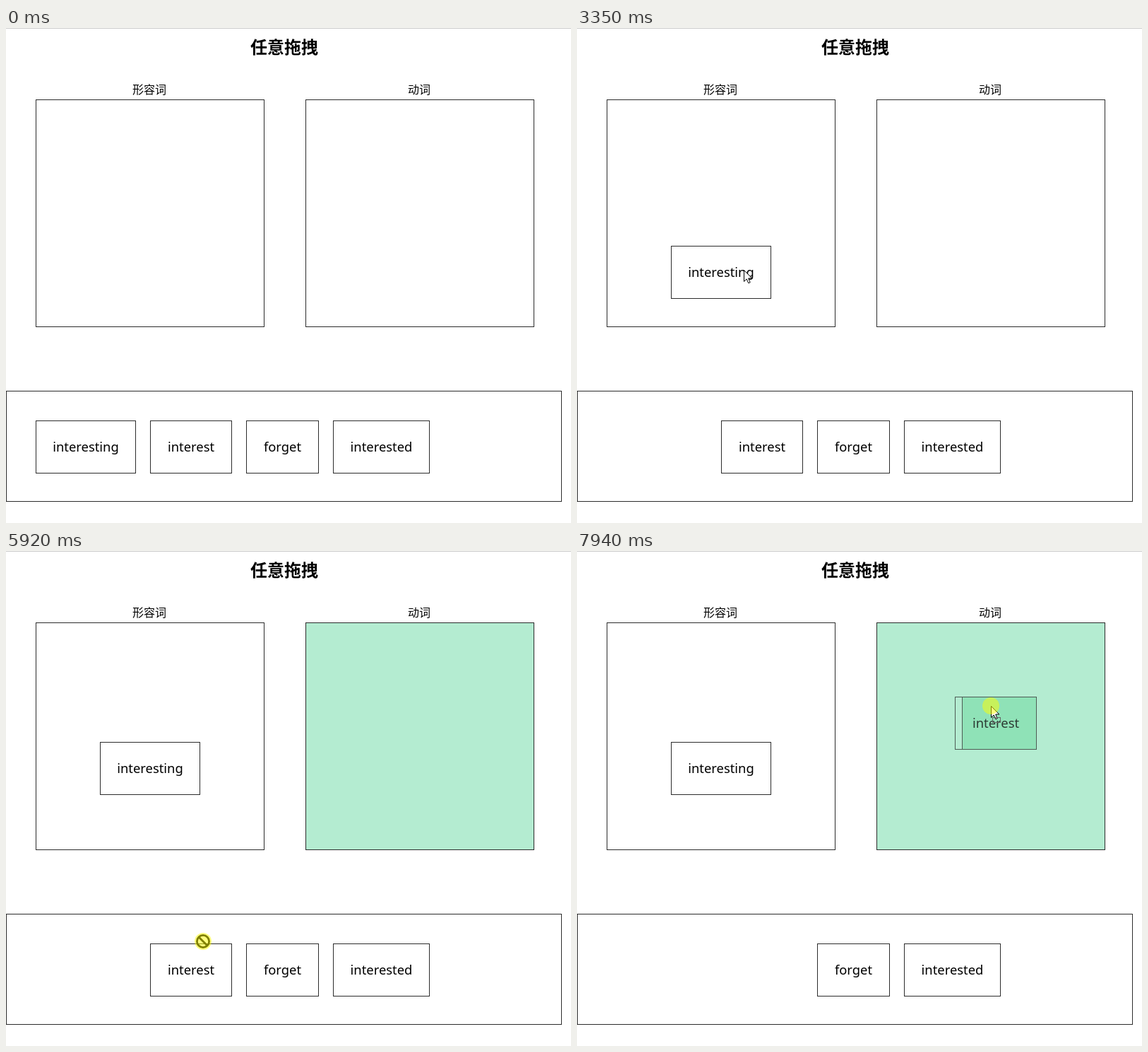
Recreate the animation shown at these times as an HTML page. Size 800 by 700 pixels, loop 8 s.

```html
<!DOCTYPE html>
<html lang="zh">
<head>
<meta charset="utf-8">
<title>任意拖拽</title>
<style>
html, body { margin: 0; width: 100%; height: 100%; overflow: hidden; background: #fff; }
svg { display: block; width: 100%; height: 100%; }
text { text-anchor: middle; font: 16px "Noto Sans CJK SC", "Noto Sans CJK", "Noto Sans", sans-serif; }
.title { font-size: 24px; font-weight: bold; }
.word { font: 18.4px "Noto Sans", "Open Sans", sans-serif; }
.box { fill: none; stroke: #2c2c2c; }
.ghost { opacity: .75; }
.arrow { fill: #fff; stroke: #000; stroke-linejoin: round; }
</style>
</head>
<body>
<svg id="stage" viewBox="0 0 800 700">
  <path d="M0 .5H800" stroke="#ccc"/>
  <text class="title" x="394" y="36">任意拖拽</text>
  <text x="203" y="93">形容词</text>
  <text x="585" y="93">动词</text>
  <rect class="box" x=".5" y="513.5" width="786" height="156"/>
</svg>
<script>
const LOOP = 8000, STEP = 67, HOLD = 200, LIFT_DELAY = 135;
const PANEL = { y: 101, width: 323, height: 321 };
const CARD = { y: 555, height: 74, gap: 21 };
const stage = document.getElementById('stage');

// Each move starts where the last one ended; bow bends its path sideways.
// A move with a card drags it: pressed HOLD before the start, dropped HOLD after the end.
const moves = [
  { start: 110, end: 860, to: [179, 598], bow: 60 },
  { start: 930, end: 1280, to: [145, 589] },
  { start: 1680, end: 3150, to: [236, 342], bow: 17, card: 0 },
  { start: 3940, end: 4500, to: [236, 304], card: 0 },
  { start: 4900, end: 5650, to: [269, 577] },
  { start: 5850, end: 6600, to: [479, 342], bow: -37, card: 1 },
  { start: 7260, end: 7930, to: [586, 219], card: 1 }
];

function add(markup, className = '') {
  const g = document.createElementNS('http://www.w3.org/2000/svg', 'g');
  g.setAttribute('class', className);
  g.innerHTML = markup;
  stage.append(g);
  return g;
}

const box = (x, y, width, height) =>
  `<rect class="box" x="${x + .5}" y="${y + .5}" width="${width}" height="${height}"/>`;

const cardMarkup = ({ word, width }) =>
  box(0, 0, width, CARD.height) + `<text class="word" x="${width / 2 + .5}" y="44">${word}</text>`;

// A card lifted from a panel carries the panel's colour and border with it.
function tintMarkup(width, edge) {
  const border = edge > 0 ? `<path d="M${edge + .5} 0V${CARD.height + 1}" stroke="#2c2c2c"/>` : '';
  const left = Math.max(edge, 0);
  return `<rect x="${left}" width="${width - left}" height="${CARD.height + 1}" fill="#3ecc7e" fill-opacity=".42"/>` + border;
}

const panels = [42, 424].map(x => ({ x, node: add(box(x, PANEL.y, PANEL.width, PANEL.height)) }));

let nextX = 42;
const cards = Object.entries({ interesting: 141, interest: 115, forget: 102, interested: 136 })
  .map(([word, width]) => {
    const card = { word, width, home: [nextX, CARD.y] };
    nextX += width + CARD.gap;
    card.node = add(cardMarkup(card));
    return card;
  });

let from = [660, 667];
const places = cards.map(card => card.home);
for (const move of moves) {
  move.from = from;
  from = move.to;
  if (move.card === undefined) continue;
  const origin = places[move.card], { width } = cards[move.card];
  const grab = move.from.map((v, i) => v - origin[i]);
  const lifted = origin[1] < CARD.y;
  const edge = panels[move.card].x - origin[0];
  move.press = move.start - HOLD;
  move.drop = move.end + HOLD;
  move.grip = [20 + grab[0] * .47, 3 + grab[1] * .47];
  move.dropped = places[move.card] = move.to.map((v, i) => v - grab[i]);
  move.ghost = add((lifted ? tintMarkup(width, edge) : '') + cardMarkup(cards[move.card]), 'ghost');
}
const drags = moves.filter(move => move.ghost);

const pointer = add('');
const arrow = '<path class="arrow" d="M.5 .5V16.5L4.2 13 6.8 18.8 9.2 17.8 6.7 12H11.8Z"/>';
const cursors = {
  arrow,
  move: arrow + '<rect x="2.5" y="16.5" width="11" height="7" fill="none" stroke="#666"/>',
  denied: '<g fill="none" stroke="#000" stroke-width="2.8"><circle r="8.6"/><path d="M-6-6L6 6"/></g>'
};
const highlight = '<circle r="12" fill="#ff0" fill-opacity=".5"/>';

const show = (node, visible) => node.setAttribute('visibility', visible ? 'visible' : 'hidden');
const place = (node, x, y) => node.setAttribute('transform', `translate(${Math.round(x)} ${Math.round(y)})`);
const ease = k => 1 - (1 - k ** 1.2) ** 1.5;

function pointerAt(t) {
  const { start, end, from: [x, y], to, bow = 0 } = moves.findLast(m => m.start <= t) ?? moves[0];
  const elapsed = Math.max(0, Math.floor((t - start) / STEP) * STEP);
  const k = t >= end ? 1 : ease(elapsed / (end - start));
  const dx = to[0] - x, dy = to[1] - y;
  const bend = bow * Math.sin(Math.PI * k) / Math.hypot(dx, dy);
  return [x + dx * k - dy * bend, y + dy * k + dx * bend];
}

function isOver(panel, x, y) {
  return x > panel.x && x < panel.x + PANEL.width && y > PANEL.y && y < PANEL.y + PANEL.height;
}

function draw(t) {
  const [x, y] = pointerAt(t);
  const pressed = drags.find(d => t >= d.press && t < d.drop);
  const dragging = pressed && t >= pressed.start ? pressed : null;
  const lifted = dragging && t >= dragging.start + LIFT_DELAY ? dragging : null;

  panels.forEach(({ node }, i) => {
    node.firstChild.style.fill = dragging?.card === i ? '#b4ecd1' : 'none';
  });
  cards.forEach(({ node, home }, i) => {
    const last = drags.findLast(d => d.card === i && t >= d.drop);
    place(node, ...(last ? last.dropped : home));
    show(node, lifted?.card !== i);
  });
  for (const drag of drags) {
    show(drag.ghost, drag === lifted);
    place(drag.ghost, x - drag.grip[0], y - drag.grip[1]);
  }

  let cursor = cursors.arrow;
  if (dragging) cursor = isOver(panels[dragging.card], x, y) ? cursors.move : cursors.denied;
  pointer.innerHTML = cursor + (pressed ? highlight : '');
  place(pointer, x, y);
  show(pointer, t >= moves[0].start);
}

const began = performance.now();
function tick() {
  draw((performance.now() - began) % LOOP);
  requestAnimationFrame(tick);
}
tick();
</script>
</body>
</html>
```
